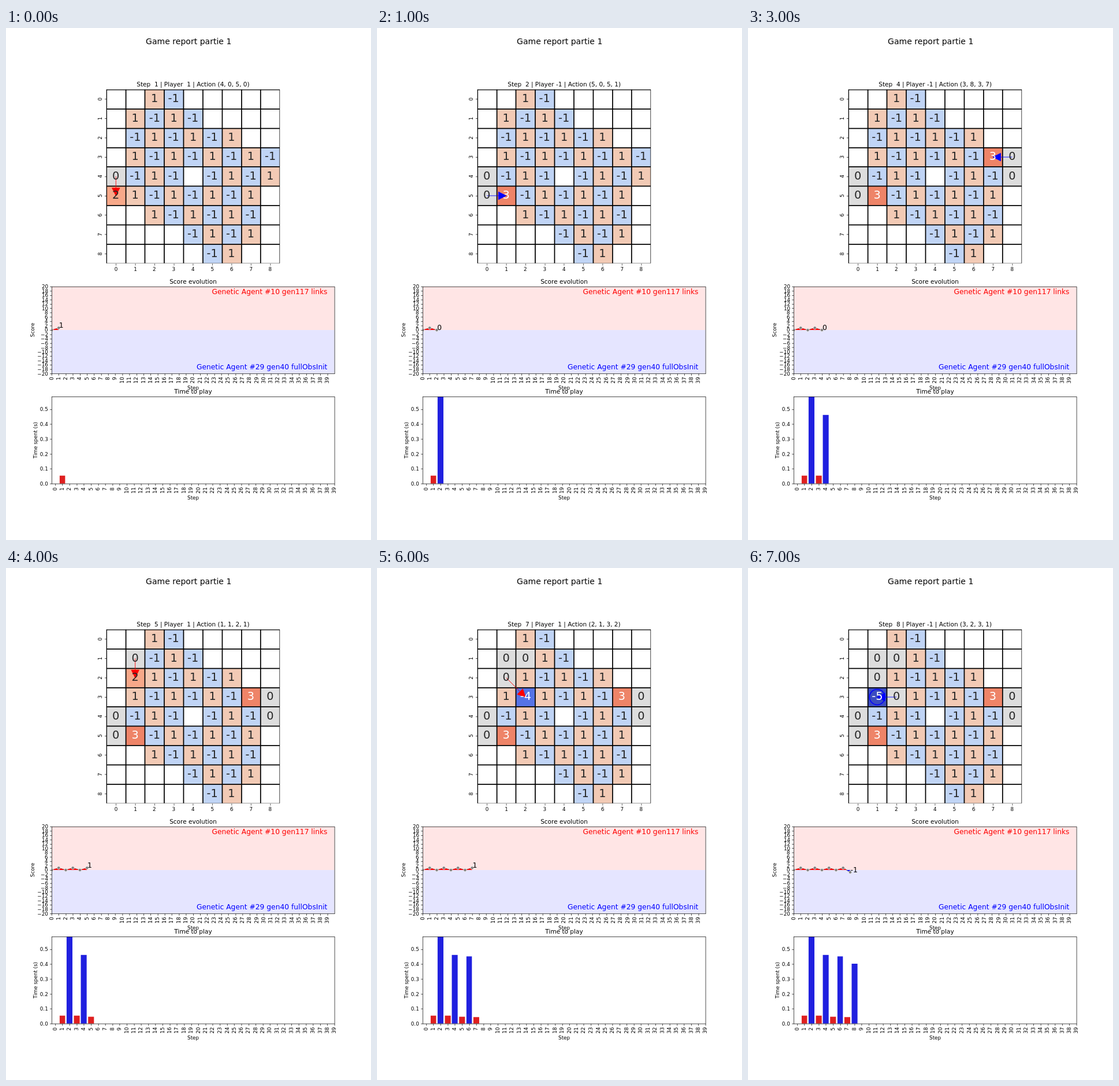
These frames come from a looping animation (632x885 px, 8 s). An HTML page with a canvas:

```html
<!DOCTYPE html>
<html lang="en">
<head>
<meta charset="utf-8">
<title>Game report</title>
<style>
html, body { margin: 0; width: 100%; height: 100%; overflow: hidden; background: #fff; }
canvas { display: block; }
</style>
</head>
<body>
<canvas id="stage" width="632" height="885"></canvas>
<script>
// The figure is laid out on 1000 x 1400 units and scaled down to the stage.
const ctx = document.getElementById('stage').getContext('2d');
ctx.scale(632 / 1000, 885 / 1400);

const PT = 100 / 72;
const SMALL = 10 * PT, TITLE = 12 * PT, LEGEND = 14 * PT, HEADING = 16 * PT, CELL_TEXT = 22 * PT;
const LEFT = 125, RIGHT = 900, MID = 512.5, PAD = 7 * PT, THIN = 0.8 * PT;
const BOARD = { x: 274.7, y: 168, cell: 52.84, size: 475.6 };
const SCORE = { top: 707, bottom: 944.8 };
const TIME = { top: 1008.2, bottom: 1246 };

const START = [
  '..+-.....', '.+-+-....', '.-+-+-+..', '.+-+-+-+-', '+-+-.-+-+',
  '-+-+-+-+.', '..+-+-+-.', '....-+-+.', '.....-+..'
];
const MOVES = [
  [4, 0, 5, 0], [5, 0, 5, 1], [4, 8, 3, 8], [3, 8, 3, 7],
  [1, 1, 2, 1], [1, 2, 2, 1], [2, 1, 3, 2], [3, 2, 3, 1]
];
const SCORES = [0, 1, 0, 1, 0, 1, 0, 1, -1];
const DURATIONS = [0.054, 0.6, 0.054, 0.4613, 0.046, 0.4515, 0.044, 0.403];
const COLORS = {
  '-5': '#3b4cc0', '-4': '#5673e6', '-3': '#7b9ff9', '-1': '#c0d4f5',
  0: '#dddddd', 1: '#f2cab5', 2: '#f7a889', 3: '#ee8468'
};

const snap = v => Math.round(v) + 0.5;
const center = i => (i + 0.5) * BOARD.cell;
const scoreX = step => LEFT + step * (RIGHT - LEFT) / 40;
const scoreY = value => (SCORE.top + SCORE.bottom) / 2 - value * (SCORE.bottom - SCORE.top) / 40;
const timeX = step => LEFT + (step + 0.5) * (RIGHT - LEFT) / 39.5;
const timeY = seconds => TIME.bottom - seconds * 406.8;

function text(str, x, y, size, align = 'center', color = '#000', vertical = false) {
  ctx.save();
  ctx.font = `${size}px "DejaVu Sans", sans-serif`;
  ctx.fillStyle = color;
  const shift = ctx.measureText(str).width * { left: 0, center: 0.5, right: 1 }[align];
  if (vertical) {
    ctx.translate(Math.round(x), Math.round(y + shift));
    ctx.rotate(-Math.PI / 2);
  } else {
    ctx.translate(Math.round(x - shift), Math.round(y));
  }
  ctx.fillText(str, 0, 0);
  ctx.restore();
}

function line(x1, y1, x2, y2, width = THIN, color = '#000') {
  ctx.strokeStyle = color;
  ctx.lineWidth = width;
  ctx.beginPath();
  ctx.moveTo(x1, y1);
  ctx.lineTo(x2, y2);
  ctx.stroke();
}

function clipped(x, y, w, h, draw) {
  ctx.save();
  ctx.beginPath();
  ctx.rect(x, y, w, h);
  ctx.clip();
  draw();
  ctx.restore();
}

const tickDown = (x, y) => line(snap(x), snap(y), snap(x), snap(y) + 5);
const tickLeft = (x, y) => line(snap(x) - 5, snap(y), snap(x), snap(y));

function frame({ top, bottom }) {
  ctx.strokeStyle = '#000';
  ctx.lineWidth = THIN;
  ctx.strokeRect(snap(LEFT), snap(top), snap(RIGHT) - snap(LEFT), snap(bottom) - snap(top));
}

function stepAxis(toX, bottom) {
  for (let i = 0; i < 40; i++) {
    tickDown(toX(i), bottom);
    text(i, toX(i) + 0.276 * SMALL, bottom + PAD, SMALL, 'right', '#000', true);
  }
  text('Step', MID, bottom + 43.6, SMALL);
}

function boardAfter(step) {
  const board = START.map(row => [...row].map(c => ({ '+': 1, '-': -1 })[c] ?? null));
  for (const [r1, c1, r2, c2] of MOVES.slice(0, step)) {
    const moved = board[r1][c1];
    board[r2][c2] = Math.sign(moved) * (Math.abs(moved) + Math.abs(board[r2][c2]));
    board[r1][c1] = 0;
  }
  return board;
}

function drawArrow([r1, c1, r2, c2], color) {
  const { cell } = BOARD;
  const length = Math.hypot(r2 - r1, c2 - c1) * cell, head = 0.4 * cell;
  ctx.save();
  ctx.translate(center(c1), center(r1));
  ctx.rotate(Math.atan2(r2 - r1, c2 - c1));
  line(0, 0, length - head, 0, PT, color);
  ctx.fillStyle = color;
  ctx.lineJoin = 'round';
  ctx.beginPath();
  ctx.moveTo(length, 0);
  ctx.lineTo(length - head, head / 2);
  ctx.lineTo(length - head, -head / 2);
  ctx.closePath();
  ctx.fill();
  ctx.stroke();
  ctx.restore();
}

function drawBoard(step, color) {
  const { x, y, cell, size } = BOARD;
  const board = boardAfter(step), move = MOVES[step - 1];
  const eachCell = draw => board.forEach((row, r) => row.forEach((v, c) => v !== null && draw(v, r, c)));

  clipped(x, y, size, size, () => {
    eachCell((v, r, c) => {
      ctx.fillStyle = COLORS[v];
      ctx.fillRect(x + c * cell, y + r * cell, cell, cell);
    });
    for (let i = 0; i < 10; i++) {
      const gx = snap(x + i * cell), gy = snap(y + i * cell);
      line(gx, y, gx, y + size, 2 * PT);
      line(x, gy, x + size, gy, 2 * PT);
    }
    ctx.translate(x, y);
    drawArrow(move, color);
    const [, , r2, c2] = move;
    if (Math.abs(board[r2][c2]) === 5) {
      ctx.strokeStyle = color;
      ctx.lineWidth = 2.4;
      ctx.beginPath();
      ctx.arc(center(c2), center(r2), 0.4 * cell, 0, 2 * Math.PI);
      ctx.stroke();
    }
  });

  eachCell((v, r, c) => {
    const ink = v > 2 || v < -2 ? '#fff' : '#262626';
    text(v, x + center(c), y + center(r) + 0.276 * CELL_TEXT, CELL_TEXT, 'center', ink);
  });
  for (let i = 0; i < 9; i++) {
    tickDown(x + center(i), y + size);
    text(i, x + center(i), y + size + 20.3, SMALL);
    tickLeft(x, y + center(i));
    text(i, x - 12.6, y + center(i), SMALL, 'center', '#000', true);
  }
  const player = step % 2 ? ' 1' : '-1';
  text(`Step  ${step} | Player ${player} | Action (${move.join(', ')})`, MID, y - 6 * PT, TITLE);
}

function drawScore(step) {
  const { top, bottom } = SCORE, zero = scoreY(0), width = RIGHT - LEFT;
  const points = SCORES.slice(0, step + 1).map((s, i) => [scoreX(i), scoreY(s)]);
  const [endX, endY] = points[step];
  const trace = () => {
    ctx.beginPath();
    points.forEach(p => ctx.lineTo(...p));
  };
  const half = (y, h, background, color) => clipped(LEFT, y, width, h, () => {
    ctx.fillStyle = background;
    ctx.fillRect(LEFT, y, width, h);
    trace();
    ctx.strokeStyle = '#808080';
    ctx.lineWidth = 1.5 * PT;
    ctx.stroke();
    ctx.lineTo(endX, zero);
    ctx.fillStyle = color;
    ctx.fill();
  });
  half(top, zero - top, '#ffe5e5', '#f00');
  half(zero, bottom - zero, '#e5e5ff', '#00f');

  clipped(LEFT, top, width, bottom - top, () => {
    ctx.strokeStyle = '#fff';
    ctx.fillStyle = '#808080';
    ctx.lineWidth = 0.75 * PT;
    for (const [px, py] of points) {
      ctx.beginPath();
      ctx.arc(px, py, 3 * PT, 0, 2 * Math.PI);
      ctx.fill();
      ctx.stroke();
    }
  });

  frame(SCORE);
  for (let v = -20; v <= 20; v += 2) {
    tickLeft(LEFT, scoreY(v));
    text(String(v).replace('-', '\u2212'), LEFT - PAD, scoreY(v) + 0.365 * SMALL, SMALL, 'right');
  }
  stepAxis(scoreX, bottom);
  text('Score', 77.5, zero, SMALL, 'center', '#000', true);
  text('Score evolution', MID, top - 6 * PT, TITLE);
  text('Genetic Agent #10 gen117 links', scoreX(39), 728, LEGEND, 'right', '#f00');
  text('Genetic Agent #29 gen40 fullObsInit', scoreX(39), 934, LEGEND, 'right', '#00f');
  text(SCORES[step], endX + 1, endY, LEGEND, 'left');
}

function drawTime(step) {
  const { top, bottom } = TIME;
  clipped(LEFT, top, RIGHT - LEFT, bottom - top, () => {
    DURATIONS.slice(0, step).forEach((seconds, i) => {
      const x1 = Math.round(timeX(i + 0.6)), x2 = Math.round(timeX(i + 1.4));
      const y = Math.round(timeY(seconds));
      ctx.fillStyle = i % 2 ? '#2020df' : '#df2020';
      ctx.fillRect(x1, y, x2 - x1, bottom - y);
    });
  });
  frame(TIME);
  for (let i = 0; i < 6; i++) {
    tickLeft(LEFT, timeY(i / 10));
    text((i / 10).toFixed(1), LEFT - PAD, timeY(i / 10) + 0.365 * SMALL, SMALL, 'right');
  }
  stepAxis(timeX, bottom);
  text('Time spent (s)', 84.5, (top + bottom) / 2, SMALL, 'center', '#000', true);
  text('Time to play', MID, top - 6 * PT, TITLE);
}

function render() {
  const step = Math.floor(performance.now() % 8000 / 1000) + 1;
  ctx.fillStyle = '#fff';
  ctx.fillRect(0, 0, 1000, 1400);
  text('Game report partie 1', 500, 45, HEADING);
  drawBoard(step, step % 2 ? '#f00' : '#00f');
  drawScore(step);
  drawTime(step);
  requestAnimationFrame(render);
}
render();
</script>
</body>
</html>
```
